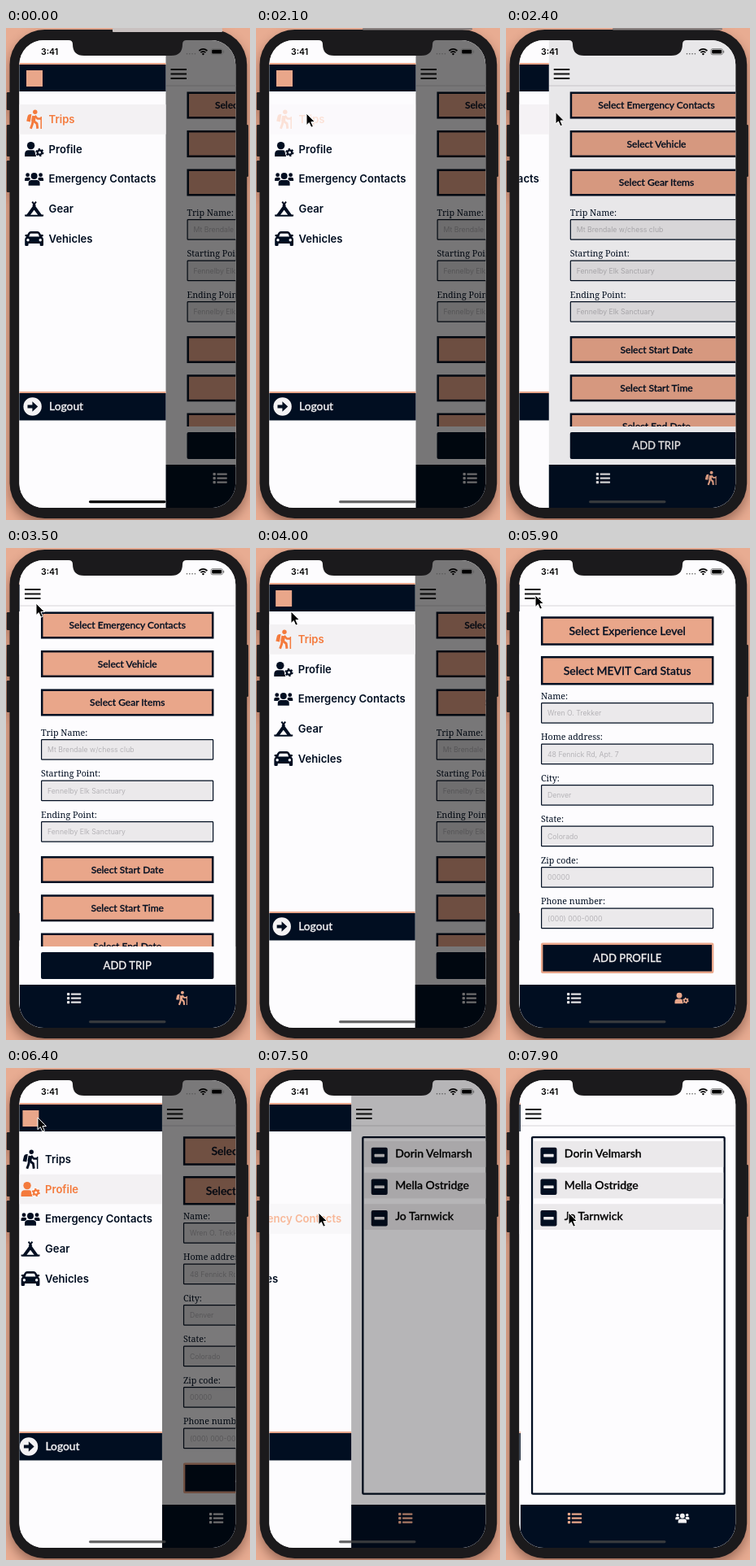
An HTML page that plays this animation: 300 px wide and 605 px high, repeating every 8 s.

```html
<!DOCTYPE html>
<html lang="en">
<head>
<meta charset="utf-8">
<title>Trip planner drawer</title>
<style>
  html, body { margin: 0; width: 100%; height: 100%; overflow: hidden; background: #e8ac92; }
  svg { display: block; width: 100%; height: 100%; --hole: #fdfcfe; }
  .ui { font-family: Inter, "Liberation Sans", sans-serif; }
  .geo { font-family: Lato, "Open Sans", sans-serif; font-weight: 500; fill: currentColor; stroke: currentColor; stroke-width: .3; }
  .serif { font: 10.7px "Noto Serif", serif; }
  .hint { font-size: 8.7px; fill: #b5b3b7; }
  .tabs { --hole: #010e21; }
  .shell { filter: drop-shadow(0 7px 7px rgba(60, 25, 15, .45)); }
</style>
</head>
<body>
<svg id="stage" viewBox="0 0 300 605" xmlns="http://www.w3.org/2000/svg"></svg>
<script>
const NAVY = '#010e21', SALMON = '#e9a68a', ORANGE = '#f47a3c', PAPER = '#fdfcfe', GRAY = '#ebe9eb', HOLE = 'var(--hole)';
const LOOP = 8000, STEP = 100, DRAWER = 179.5;

const rect = (x, y, w, h, fill, more = '') =>
  `<rect x="${x}" y="${y}" width="${w}" height="${h}" fill="${fill}" ${more}/>`;
const text = (x, y, str, cls, more = '') => `<text x="${x}" y="${y}" class="${cls}" ${more}>${str}</text>`;
const line = (d, w) => `<path d="${d}" fill="none" stroke="currentColor" stroke-width="${w}" stroke-linejoin="round"/>`;
const solid = (d, fill = 'currentColor') => `<path d="${d}" fill="${fill}"/>`;
const dot = (x, y, r, fill = 'currentColor') => `<circle cx="${x}" cy="${y}" r="${r}" fill="${fill}"/>`;
const place = (x, y, scale, color, body) =>
  `<g transform="translate(${x} ${y}) scale(${scale})" color="${color}">${body}</g>`;

// Icons are drawn around their own centre, about 23 units wide.
const icons = {
  hiker: dot(1.2, -9, 2.7) +
    solid('M-3.2-6.2Q-7.4-7-8.2-3L-9.4 2.2L-4.8 3.2Z') +
    line('M0-4.2L-1.2 2.5', 4.8) + line('M-1.5 2L-2.2 6L-4.2 11.4', 2.9) +
    line('M0 2.5L3.4 5.2L4.2 11.4', 2.9) + line('M1-4.5L4 -.8H8.5', 2.4) + line('M8.6-3.4V11.6', 1.5),
  profile: dot(-4, -4.4, 4.7) +
    solid('M-11.5 9V6Q-11.5 1.2-7 1.2H-1.5Q1 1.2 1 3.5L2.5 9Z') +
    dot(6.8, 4, 5.6, HOLE) + dot(6.8, 4, 3.8) +
    '<circle cx="6.8" cy="4" r="4.1" fill="none" stroke="currentColor" stroke-width="2" stroke-dasharray="2.2 2.09"/>' +
    dot(6.8, 4, 1.6, HOLE),
  users: dot(0, -3.8, 4) + dot(-8, -5, 2.4) + dot(8, -5, 2.4) +
    solid('M-7 8V5.4Q-7 1.2-3 1.2H3Q7 1.2 7 5.4V8Z') +
    solid('M-11.5 2.4V0Q-11.5-2-9.2-2H-7Q-5.6-2-5 -1Q-4 .6-7.2 2.4Z') +
    solid('M11.5 2.4V0Q11.5-2 9.2-2H7Q5.6-2 5 -1Q4 .6 7.2 2.4Z'),
  tent: line('M-2.4-8.8L1.5-3.5M2.4-8.8L-1.5-3.5M-11.5 8.2H11.5', 2) +
    solid('M0-5.6L10.6 9H-10.6Z') + solid('M0 1.4L4.6 7.4H-4.6Z', HOLE),
  car: solid('M-11.4-3.6Q-11.4-5-10-5H-8.4L-7-7.4Q-6.2-9-4-9H4Q6.2-9 7-7.4L8.4-5H10Q11.4-5 11.4-3.6L9.6-2.4Q11.4-1.2 11.4 1V7.5Q11.4 9 10 9H8.4Q7 9 7 7.5V6H-7V7.5Q-7 9-8.4 9H-10Q-11.4 9-11.4 7.5V1Q-11.4-1.2-9.6-2.4Z') +
    solid('M-6.4-2.6L-5-6Q-4.7-6.4-4-6.4H4Q4.7-6.4 5-6L6.4-2.6Z', HOLE) +
    dot(-7.6, 1.6, 1.7, HOLE) + dot(7.6, 1.6, 1.7, HOLE),
  list: [-5, 0, 5].map(y => rect(-8.5, y - 1.6, 3.3, 3.3, 'currentColor', 'rx=".8"') +
    rect(-3.6, y - 1.1, 12.4, 2.3, 'currentColor', 'rx=".6"')).join('')
};

const button = (y, h, label, size) =>
  rect(44.2, y + 1.2, 210, h - 2.4, SALMON, `stroke="${NAVY}" stroke-width="2.5"`) +
  text(149.2, y + h / 2 + size * .35, label, 'geo', `font-size="${size}" text-anchor="middle" color="${NAVY}"`);

const field = (y, label, hint) =>
  text(43, y - 4.2, label, 'serif', `fill="${NAVY}"`) +
  rect(43.6, y + .6, 211, 24.6, GRAY, `stroke="${NAVY}" stroke-width="1.2" rx=".8"`) +
  text(51, y + 16, hint, 'ui hint');

const submit = (y, h, label, edge) =>
  rect(44.2, y + 1.2, 210, h - 2.4, NAVY, `stroke="${edge}" stroke-width="2.4" rx=".8"`) +
  text(149.2, y + h / 2 + 4.8, label, 'geo', 'font-size="13.1" text-anchor="middle" color="#f0edee"');

const tabs = (listColor, icon, iconColor) =>
  '<g class="tabs">' + rect(16, 537, 267, 55, NAVY) + place(83.5, 553.5, 1, listColor, icons.list) +
  place(216, 553.5, .74, iconColor, icons[icon]) + '</g>';

const tripsPage =
  button(78.5, 33, 'Select Emergency Contacts', 12) +
  button(126, 33, 'Select Vehicle', 12) +
  button(173.5, 33, 'Select Gear Items', 12) +
  field(235, 'Trip Name:', 'Mt Brendale w/chess club') +
  field(285.5, 'Starting Point:', 'Fennelby Elk Sanctuary') +
  field(336, 'Ending Point:', 'Fennelby Elk Sanctuary') +
  button(379, 33, 'Select Start Date', 12) +
  button(426.3, 33, 'Select Start Time', 12) +
  button(473.6, 33, 'Select End Date', 12) +
  rect(16, 490, 267, 50, PAPER) + submit(497, 33, 'ADD TRIP', NAVY) +
  tabs('#e4e2e4', 'hiker', SALMON);

const profileFields = [
  ['Name:', 'Wren O. Trekker'], ['Home address:', '48 Fennick Rd, Apt. 7'], ['City:', 'Denver'],
  ['State:', 'Colorado'], ['Zip code:', '00000'], ['Phone number:', '(000) 000-0000']
];
const profilePage =
  button(84.3, 35.4, 'Select Experience Level', 13.9) +
  button(133, 35.4, 'Select MEVIT Card Status', 13.9) +
  profileFields.map(([label, hint], i) => field(190 + i * 50.5, label, hint)).join('') +
  submit(485.5, 37.5, 'ADD PROFILE', SALMON) + tabs('#e4e2e4', 'profile', SALMON);

const contactsPage =
  rect(31.2, 85.1, 236.6, 438.6, 'none', `stroke="${NAVY}" stroke-width="2.3" rx="1"`) +
  ['Dorin Velmarsh', 'Mella Ostridge', 'Jo Tarnwick'].map((name, i) => {
    const y = 90 + i * 38.6;
    return rect(33, y, 233.5, 31.8, GRAY) + rect(41.6, y + 7.8, 20, 19.6, NAVY, 'rx="2"') +
      rect(45.4, y + 15.8, 12.4, 3.6, GRAY, 'rx=".6"') + text(71, y + 20, name, 'geo', 'font-size="14"');
  }).join('') +
  tabs(SALMON, 'users', '#f4f2f4');

const items = [['Trips', 'hiker'], ['Profile', 'profile'], ['Emergency Contacts', 'users'], ['Gear', 'tent'], ['Vehicles', 'car']];
const drawer =
  rect(16, 15, DRAWER + 1, 576, PAPER) + rect(16, 43, DRAWER + 1, 2.2, SALMON) + rect(16, 45, DRAWER + 1, 33, NAVY) +
  rect(25, 52, 20, 20, SALMON) +
  items.map(([label, icon], i) => {
    const y = 112.3 + i * 36.7;
    return `<g class="item" color="${NAVY}">` + rect(16, y - 18.3, DRAWER + 1, 36.7, '#f3f1f3', 'class="glow"') +
      `<g transform="translate(34.6 ${y})">${icons[icon]}</g>` +
      text(52.6, y + 4.6, label, 'ui', 'font-size="13.1" font-weight="600" fill="currentColor"') + '</g>';
  }).join('') +
  rect(16, 447, DRAWER + 1, 2.2, SALMON) + rect(16, 449, DRAWER + 1, 33.5, NAVY) +
  dot(32.6, 465.5, 11.2, '#f4f2f4') +
  solid('M26.5 463.6H32.4V459.2L39.2 465.5L32.4 471.8V467.4H26.5Z', NAVY) +
  text(53, 470.3, 'Logout', 'geo', 'font-size="13.8" color="#f4f2f4"');

const shell = '<g class="shell">' + [[.8, 79, 22], [.8, 119, 39], [.8, 163, 39], [293, 119, 64]]
  .map(([x, y, h]) => rect(x, y, 5, h, '#222123', 'rx="1.2"')).join('') +
  rect(4.5, 2, 291.7, 601, '#1b1a1c', 'rx="43"') + '</g>';

const statusBar =
  text(43, 33, '3:41', 'ui', 'font-size="10.5" font-weight="600"') +
  [0, 1, 2, 3].map(i => dot(222.5 + i * 3.3, 31.8, .8, '#555')).join('') +
  '<g fill="none" stroke="#000" stroke-width="1.7"><path d="M237.4 28Q242.4 23.6 247.4 28"/><path d="M239.4 30.2Q242.4 27.5 245.4 30.2"/></g>' +
  dot(242.4, 32, 1.2, '#000') +
  rect(252, 25.6, 14.4, 7.2, 'none', 'rx="2" stroke="#666" stroke-width=".8"') +
  rect(253.2, 26.8, 12, 4.8, '#000', 'rx="1"') + rect(267.2, 27.8, 1, 2.8, '#666');

const notch = solid('M77 14V15Q82 15 82 20Q82 34 96 34H203Q217 34 217 20Q217 15 222 15V14Z', '#1b1a1c');

const stage = document.getElementById('stage');
stage.innerHTML =
  `<clipPath id="screen">${rect(16.4, 15, 265.8, 575, '#000', 'rx="30"')}</clipPath>` +
  rect(0, 0, 300, 605, '#e8ac92') + shell + rect(131, 0, 135, 5, '#c9c1c0', 'id="bar" rx="1"') +
  `<g clip-path="url(#screen)">` + rect(16, 15, 267, 576, PAPER) +
  `<g id="page">` + rect(16.5, 15, 267, 576, PAPER) +
  [tripsPage, profilePage, contactsPage].map(p => `<g class="view">${p}</g>`).join('') +
  rect(16.5, 70.5, 267, 1, '#d8d6d9') +
  [50, 55.5, 61].map(y => rect(23, y, 19.5, 2, '#111')).join('') +
  rect(16.5, 15, 267, 576, '#000', 'id="dim"') + '</g>' +
  `<g id="drawer">${drawer}</g>${statusBar}` +
  rect(102, 581, 94.5, 3.2, '#000', 'id="home" rx="1.6"') + '</g>' + notch +
  `<path id="cursor" d="M0 0V14.6L3.3 11.5L5.8 17.2L8.4 16.1L5.9 10.5H10.4Z" fill="#000" stroke="#fff" stroke-width="1"/>`;

const [page, dim, drawerEl, home, bar, cursor] =
  ['page', 'dim', 'drawer', 'home', 'bar', 'cursor'].map(id => document.getElementById(id));
const views = [...document.querySelectorAll('.view')];
const rows = [...document.querySelectorAll('.item')];

const TO_PROFILE = 4718, TO_CONTACTS = 7400;
const moves = [[-9e3, 1], [2200, 0], [3500, 1], [TO_PROFILE, 0], [6030, 1], [TO_CONTACTS, 0]];
const presses = [[2000, 2200], [4550, TO_PROFILE], [7200, TO_CONTACTS]];
const path = [
  [1100, 190, 2], [1900, 62, 105], [2300, 62, 105], [3200, 34, 60], [3500, 37, 68], [4000, 43, 78],
  [4450, 69, 144], [5100, 69, 144], [5900, 36, 58], [6400, 39, 61], [7000, 77, 178], [8000, 77, 178]
];

// Critically damped spring, from 0 to 1.
const spring = ms => { const k = ms * .015; return 1 - (1 + k) * Math.exp(-k); };

function openness(t) {
  const [start, to] = moves.filter(m => m[0] <= t).pop();
  return to ? spring(t - start) : 1 - spring(t - start);
}

function cursorAt(t) {
  const i = Math.max(1, path.findIndex(p => p[0] >= t));
  const [t0, x0, y0] = path[i - 1], [t1, x1, y1] = path[i];
  const u = Math.max(0, (t - t0) / (t1 - t0)), e = u * u * (3 - 2 * u);
  return [x0 + (x1 - x0) * e, y0 + (y1 - y0) * e];
}

function pressOpacity(t, [down, up]) {
  if (t < down || t > up + 250) return 1;
  if (t <= up) return 1 - .8 * Math.min(1, (t - down) / 90);
  return .2 + .8 * (t - up) / 250;
}

function render(t) {
  const p = openness(t);
  const active = t < TO_PROFILE ? 0 : t < TO_CONTACTS ? 1 : 2;
  page.setAttribute('transform', `translate(${DRAWER * p} 0)`);
  drawerEl.setAttribute('transform', `translate(${DRAWER * (p - 1)} 0)`);
  // The shade only sets in once the drawer is 5 % open.
  dim.setAttribute('opacity', .53 * Math.max(0, (p - .05) / .95));
  views.forEach((v, i) => v.setAttribute('display', i === active ? 'inline' : 'none'));
  rows.forEach((row, i) => {
    row.setAttribute('color', i === active ? ORANGE : NAVY);
    row.setAttribute('opacity', presses[i] ? pressOpacity(t, presses[i]) : 1);
    row.querySelector('.glow').setAttribute('opacity', i === active ? 1 : 0);
  });
  home.setAttribute('fill', t < 300 ? '#000' : '#444');
  home.setAttribute('opacity', t < 300 ? 1 : t < 400 ? .9 : .8);
  bar.setAttribute('height', t < 300 ? 5 : 2.5);
  bar.setAttribute('fill', t < 300 ? '#c9c1c0' : '#8a8180');
  bar.setAttribute('display', t < 2800 ? 'inline' : 'none');
  cursor.setAttribute('display', t < 1100 ? 'none' : 'inline');
  cursor.setAttribute('transform', `translate(${cursorAt(t).join(' ')})`);
}

const origin = performance.now();
function tick() {
  const t = Math.max(0, performance.now() - origin) % LOOP;
  render(Math.floor(t / STEP) * STEP);
  requestAnimationFrame(tick);
}
tick();
</script>
</body>
</html>
```
